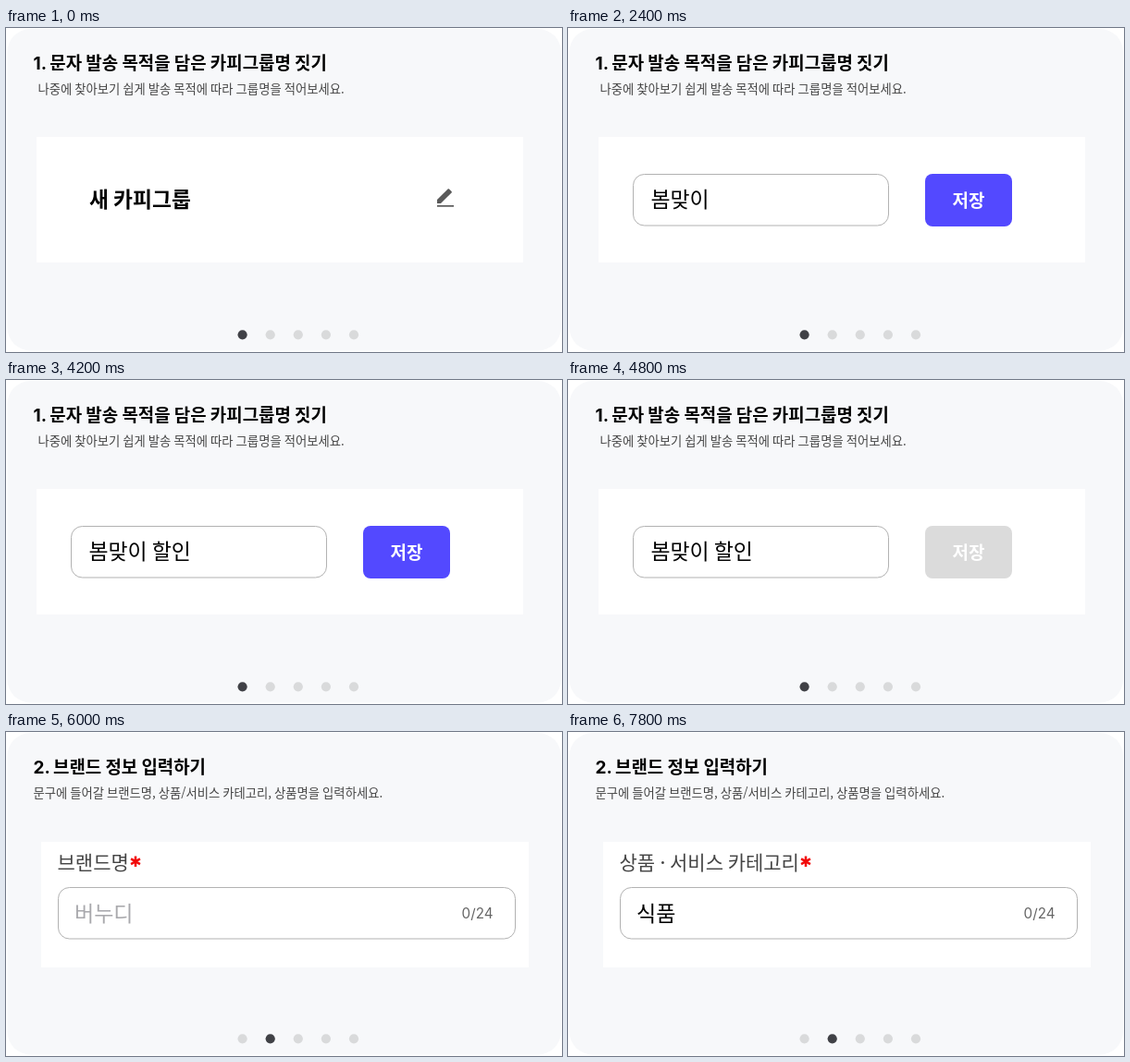
An HTML page with a canvas for the animation above (8 s loop, 601 by 351 pixels).

```html
<!DOCTYPE html>
<html lang="ko">
<head>
<meta charset="utf-8">
<title>카피그룹 안내</title>
<style>
  html, body { margin: 0; width: 100%; height: 100%; overflow: hidden; background: #fff; }
  canvas { display: block; width: 601px; height: 351px; }
</style>
</head>
<body>
<canvas id="stage" width="601" height="351"></canvas>
<script>
const ctx = document.getElementById('stage').getContext('2d');
const STEP = 600, LOOP = 8000;
const HANGUL = '"Noto Sans CJK KR", "Noto Sans KR", "Noto Sans CJK JP", "Noto Sans CJK", sans-serif';
const LATIN = 'Inter, sans-serif';
const PURPLE = '#5349ff', GREY = '#dbdbdb', BORDER = '#b2b2b2';

function text(str, x, y, size, { weight = 400, color = '#000', align = 'left', family = HANGUL } = {}) {
  ctx.font = `${weight} ${size}px ${family}`;
  ctx.textAlign = align;
  ctx.fillStyle = color;
  ctx.fillText(str, x, y);
}

function box(x, y, w, h, r, fill, stroke) {
  ctx.beginPath();
  ctx.roundRect(x, y, w, h, r);
  if (fill) { ctx.fillStyle = fill; ctx.fill(); }
  if (stroke) { ctx.strokeStyle = stroke; ctx.lineWidth = 1; ctx.stroke(); }
}

function polygon(points, color) {
  ctx.beginPath();
  points.forEach(([x, y]) => ctx.lineTo(x, y));
  ctx.closePath();
  ctx.fillStyle = color;
  ctx.fill();
}

function page(number, title, titleX, note, noteX) {
  box(0, 0, 601, 351, 0, '#fff');
  box(1.5, 1, 598.5, 348.5, 25, '#f7f8fa');
  text(number + '.', 29.5, 45, 19, { weight: 700, family: LATIN });
  text(title, titleX, 45, 18.9, { weight: 700 });
  text(note, noteX, 71, 13.33, { color: '#444' });
  for (let i = 0; i < 5; i++) {
    ctx.beginPath();
    ctx.arc(255.6 + i * 30.1, 332.3, 5.1, 0, Math.PI * 2);
    ctx.fillStyle = i === number - 1 ? '#404146' : '#d9dadb';
    ctx.fill();
  }
}

function pencil() {
  const color = '#5a5a5a';
  polygon([[466, 190], [466, 186], [477.8, 174.2], [478.8, 174.2], [481.8, 177.2], [481.8, 178.2], [470, 190]], color);
  box(466, 192, 18, 1.7, 0, color);
}

function asterisk(x, y) {
  ctx.strokeStyle = '#f20808';
  ctx.lineWidth = 2.5;
  ctx.beginPath();
  for (let i = 0; i < 3; i++) {
    const a = Math.PI / 2 + i * Math.PI / 3;
    const dx = Math.cos(a) * 5.7, dy = Math.sin(a) * 5.7;
    ctx.moveTo(x - dx, y - dy);
    ctx.lineTo(x + dx, y + dy);
  }
  ctx.stroke();
}

function groupName(step) {
  page(1, '문자 발송 목적을 담은 카피그룹명 짓기', 47.3,
    '나중에 찾아보기 쉽게 발송 목적에 따라 그룹명을 적어보세요.', 34.5);
  box(33, 118, 526, 136, 0, '#fff');
  if (step === 0) {
    text('새 카피그룹', 90, 194, 22.75, { weight: 700 });
    pencil();
    return;
  }
  box(70.5, 158.5, 276, 55.5, 12, '#fff', BORDER);
  if (step === 1) {
    text('새 카피그룹', 89.5, 194, 22.9);
    box(202.6, 176, 1.7, 21, 0, '#000');
  } else {
    // one syllable per step; the space arrives with the one after it
    const typed = ['봄', '봄맞', '봄맞이', '봄맞이 할', '봄맞이 할인'];
    text(typed[Math.min(step - 2, 4)], 89.5, 194, 22.9);
  }
  const pressed = step >= 6 && step % 2 === 0;
  box(386, 158, 94, 57, 8, pressed ? GREY : PURPLE);
  text('저장', 433, 193.8, 19, { weight: 700, color: '#fff', align: 'center' });
}

function brandInfo(step) {
  page(2, '브랜드 정보 입력하기', 51,
    '문구에 들어갈 브랜드명, 상품/서비스 카테고리, 상품명을 입력하세요.', 29.5);
  box(38, 119, 527, 136, 0, '#fff');
  const label = { weight: 500, color: '#444' };
  const category = step >= 2;
  if (category) {
    text('상품', 55.5, 148.8, 21, label);
    text('·', 102.5, 148.8, 21, { ...label, align: 'center', family: LATIN });
    text('서비스 카테고리', 110, 148.8, 21, label);
  } else {
    text('브랜드명', 55.5, 148.8, 21, label);
  }
  asterisk(category ? 257 : 140, 140.3);
  box(56.5, 168.5, 494, 55.5, 12, '#fff', BORDER);
  text(category ? '식품' : '버누디', 74, 204.5, 23, { color: step % 2 ? '#000' : '#a9a9ad' });
  text('0/24', 526.5, 202.3, 15.2, { color: '#666', align: 'right', family: LATIN });
}

function draw(now) {
  const step = Math.floor((now % LOOP) / STEP);
  if (step < 10) groupName(step);
  else brandInfo(step - 10);
}

const start = performance.now();
function tick() {
  draw(performance.now() - start);
  requestAnimationFrame(tick);
}
tick();
</script>
</body>
</html>
```
